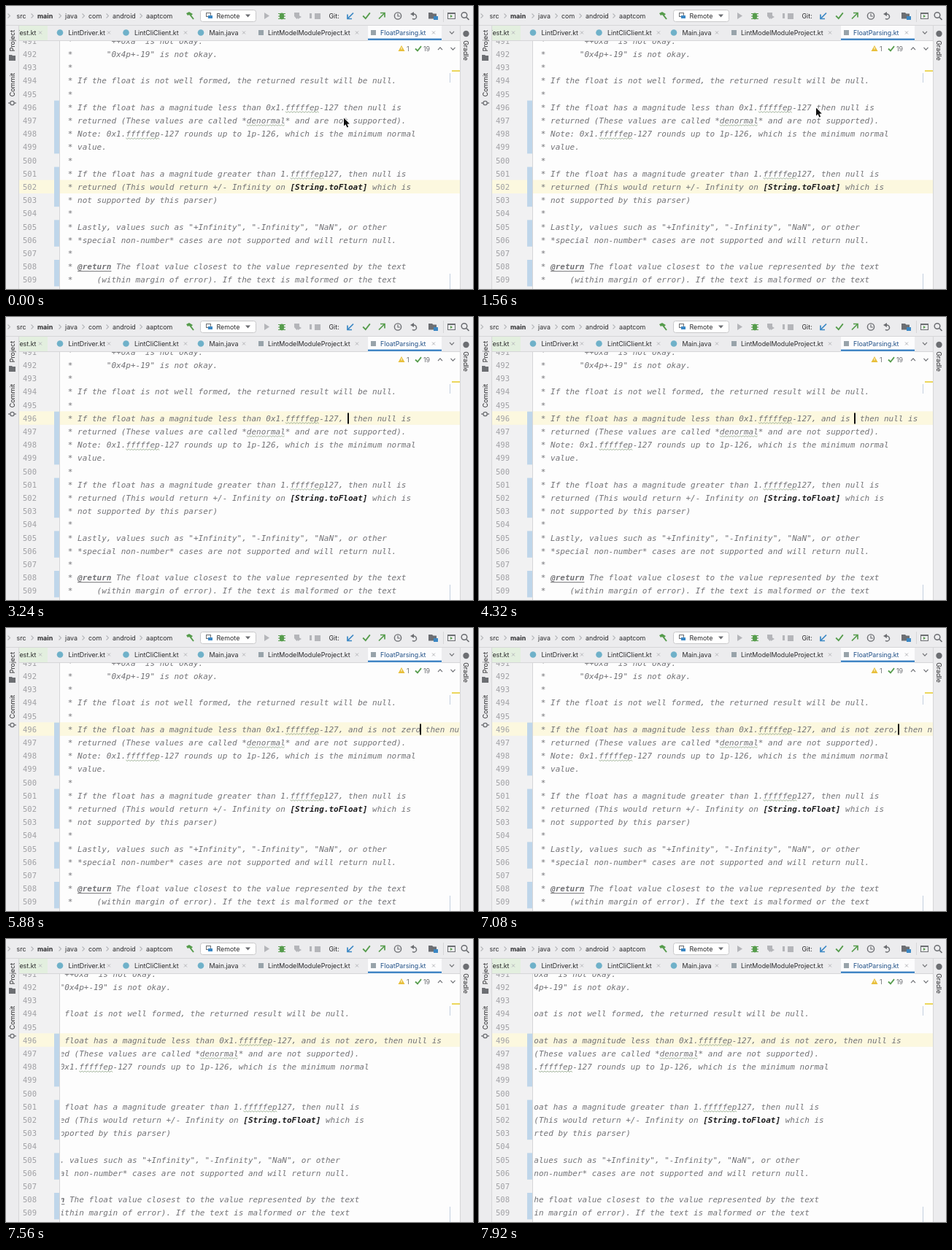
Write an HTML page with a canvas that moves like this. It is 640 px wide and 388 px high and loops after 8000 ms.

```html
<!DOCTYPE html>
<html lang="en">
<head>
<meta charset="utf-8">
<title>Editing a comment</title>
<style>
html, body { margin: 0; width: 100%; height: 100%; overflow: hidden; background: #fdfdfd; }
canvas { display: block; width: 640px; height: 388px; }
</style>
</head>
<body>
<canvas id="stage" width="640" height="388"></canvas>
<script>
const ctx = document.getElementById('stage').getContext('2d');
const LOOP = 8000, STEP = 120;
const MONO = '"DejaVu Sans Mono", "Noto Sans Mono", monospace';
const UI = 'Inter, Roboto, sans-serif';
const CODE = `italic 11px ${MONO}`, CODE_BOLD = `italic bold 11px ${MONO}`;
const LABEL = `8.9px ${UI}`;
const LEFT = 76, RIGHT = 622, TEXT_X = 84.8, ROW = 18.2, FIRST = 491;
const C = {
  paper: '#fdfdfd', chrome: '#ececee', gutter: '#f1f1f2', caretRow: '#fcf8df',
  edge: '#d6d6d8', text: '#727276', strong: '#1c1c1e', num: '#a0a0a4',
  change: '#bfd6ea', ink: '#2a2a2c', grey: '#6c6e72', pale: '#b4b5b9',
  green: '#569c4c', blue: '#3a87c4', wave: '#a3b59c', margin: '#c3cfdf'
};

const BEFORE = '* If the float has a magnitude less than 0x1.fffffep-127';
const AFTER = ' then null is';
const ADDED = ', and is not zero,';
const KEYS = [2640, 2880, 3480, 3600, 3720, 3840, 3960, 4080, 4200,
  4680, 4800, 4920, 5040, 5280, 5400, 5520, 5640, 6600];
const CLICK = 1920;

const LINES = [
  '*       "++0xa" is not okay.',
  '*       "0x4p+-19" is not okay.',
  '*',
  '* If the float is not well formed, the returned result will be null.',
  '*',
  '',
  '* returned (These values are called *denormal* and are not supported).',
  '* Note: 0x1.fffffep-127 rounds up to 1p-126, which is the minimum normal',
  '* value.',
  '*',
  '* If the float has a magnitude greater than 1.fffffep127, then null is',
  '* returned (This would return +/- Infinity on [String.toFloat] which is',
  '* not supported by this parser)',
  '*',
  '* Lastly, values such as "+Infinity", "-Infinity", "NaN", or other',
  '* *special non-number* cases are not supported and will return null.',
  '*',
  '* @return The float value closest to the value represented by the text',
  '*     (within margin of error). If the text is malformed or the text'
];
const CHANGED = [[496, 499], [501, 503], [505, 506], [508, 509]];
const SPECIAL = /(\[String\.toFloat\]|@return|fffffep|denormal)/;

const rowY = n => 47.8 + (n - FIRST) * ROW;
const clamp = v => Math.max(0, Math.min(1, v));
const smooth = v => v * v * (3 - 2 * v);

function rect(x, y, w, h, color) {
  ctx.fillStyle = color;
  ctx.fillRect(x, y, w, h);
}

function dot(x, y, r, color) {
  ctx.fillStyle = color;
  ctx.beginPath();
  ctx.arc(x, y, r, 0, Math.PI * 2);
  ctx.fill();
}

function shape(points, color, fill, width = 1.2) {
  ctx.beginPath();
  for (let i = 0; i < points.length; i += 2) ctx.lineTo(points[i], points[i + 1]);
  if (fill) {
    ctx.closePath();
    ctx.fillStyle = color;
    ctx.fill();
  } else {
    ctx.strokeStyle = color;
    ctx.lineWidth = width;
    ctx.stroke();
  }
}

function arc(x, y, r, from, to, color, width = 1.2) {
  ctx.beginPath();
  ctx.arc(x, y, r, from, to);
  ctx.strokeStyle = color;
  ctx.lineWidth = width;
  ctx.stroke();
}

function frame(x, y, w, h, color) {
  ctx.strokeStyle = color;
  ctx.lineWidth = 1;
  ctx.strokeRect(x, y, w, h);
}

function label(str, x, y, color = C.ink, font = LABEL, align = 'left') {
  ctx.font = font;
  ctx.fillStyle = color;
  ctx.textAlign = align;
  ctx.fillText(str, x, y);
}

function sideLabel(str, x, y, angle) {
  ctx.save();
  ctx.translate(x, y);
  ctx.rotate(angle);
  label(str, 0, 3.2, C.ink, LABEL, 'center');
  ctx.restore();
}

function cross(x, y) {
  shape([x - 2, y - 2, x + 2, y + 2], C.pale, false, 1);
  shape([x - 2, y + 2, x + 2, y - 2], C.pale, false, 1);
}

function chevron(x, y, dx, dy, color = C.grey) {
  const pts = dx ? [x - dx, y - 3, x + dx, y, x - dx, y + 3]
    : [x - 3, y - dy, x, y + dy, x + 3, y - dy];
  shape(pts, color, false, 1.1);
}

function check(x, y, s) {
  shape([x - s, y, x - s * .25, y + s * .75, x + s, y - s * .85], C.green, false, 1.8);
}

function arrow(x, y, d, color) {
  shape([x - 4 * d, y + 4 * d, x + 4 * d, y - 4 * d], color, false, 1.7);
  shape([x - 2 * d, y - 4 * d, x + 4 * d, y - 4 * d, x + 4 * d, y + 2 * d], color, false, 1.7);
}

function wave(x, y, w) {
  ctx.beginPath();
  for (let i = 0; i <= w; i += 2) ctx.lineTo(x + i, y + (i % 4 ? 1 : -.5));
  ctx.strokeStyle = C.wave;
  ctx.lineWidth = 1;
  ctx.stroke();
}

function codeLine(str, x, y, cell) {
  let col = 0;
  for (const part of str.split(SPECIAL)) {
    const px = x + col * cell, w = part.length * cell;
    const link = part[0] === '[', tag = part === '@return';
    label(part, px, y + 4, link ? C.strong : C.text, link || tag ? CODE_BOLD : CODE);
    if (tag) rect(px, y + 6, w, 1, C.text);
    if (part === 'fffffep' || part === 'denormal') wave(px, y + 6.3, w);
    col += part.length;
  }
}

function toolbar() {
  rect(0, 0, 640, 26, C.chrome);
  rect(0, 26, 640, 1, C.edge);
  chevron(4, 13.5, 1.5, 0, C.pale);
  const path = [['src', 14.5], ['main', 43], ['java', 81], ['com', 113], ['android', 146], ['aaptcom', 192]];
  for (const [name, x] of path) {
    label(name, x, 16.7, C.ink, name === 'main' ? `bold 8.9px ${UI}` : LABEL);
    if (x > 20) chevron(x - 7, 13.5, 1.5, 0, C.pale);
  }

  // build and run
  shape([247, 10, 251, 8, 256, 11, 254, 13, 251, 12, 249, 13], C.green, true);
  shape([251.5, 11, 257, 18], C.green, false, 2);
  ctx.beginPath();
  ctx.roundRect(266.5, 5.5, 76, 16, 3);
  ctx.fillStyle = '#fff';
  ctx.fill();
  ctx.strokeStyle = '#c8c8ca';
  ctx.lineWidth = 1;
  ctx.stroke();
  frame(274.5, 9.5, 6, 5, C.grey);
  rect(277, 13, 6, 4, C.blue);
  label('Remote', 288.5, 16.7);
  shape([328, 11.5, 335, 11.5, 331.5, 15.5], C.grey, true);
  shape([354, 9, 361, 13.5, 354, 18], C.pale, true);

  // debug tools
  ctx.fillStyle = C.green;
  ctx.beginPath();
  ctx.ellipse(378, 14, 3.2, 4.4, 0, 0, Math.PI * 2);
  ctx.fill();
  for (const y of [10.5, 14, 17.5]) shape([373, y, 383, y], C.green, false, 1);
  shape([395, 9, 402, 9, 402, 14, 398.5, 18, 395, 14], C.pale, true);
  shape([400, 12, 405, 15, 400, 18], C.pale, true);
  rect(416, 10, 3, 7, C.pale);
  rect(423, 10, 8, 8, C.pale);

  label('Git:', 442.5, 16.7);
  arrow(472, 13.5, -1, C.blue);
  check(494, 13.5, 4.8);
  arrow(515, 13.5, 1, C.green);
  arc(537, 13.5, 4.6, 0, 7, C.grey, 1.4);
  shape([537, 10.5, 537, 14, 540, 14], C.grey, false, 1.2);
  arc(559, 14.5, 3.5, -1.7, 2.2, C.grey, 1.5);
  shape([554, 11, 559, 8, 559, 14], C.grey, true);
  shape([579, 9, 584, 9, 585.5, 10.5, 590, 10.5, 590, 17.5, 579, 17.5], C.grey, true);
  rect(586, 14, 6, 5, C.blue);
  rect(599, 5, 1, 17, C.edge);
  frame(605.5, 9.5, 10, 8, C.grey);
  rect(605, 9, 11, 2, C.grey);
  shape([609, 12, 612, 14, 609, 16], C.green, true);
  arc(628, 12.5, 3.8, 0, 7, C.grey, 1.5);
  shape([631, 15.5, 634.5, 19], C.grey, false, 1.7);
}

function tabs() {
  rect(17, 27, 605, 20, C.chrome);
  rect(17, 27, 40, 20, '#e3efdf');
  rect(496, 27, 101, 20, '#fcfcfd');
  rect(496, 44.5, 101, 2.5, '#4286c5');
  rect(17, 47, 479, 1, C.edge);
  rect(597, 47, 25, 1, C.edge);
  ctx.save();
  ctx.beginPath();
  ctx.rect(17, 27, 605, 20);
  ctx.clip();
  label('Test.kt', 41.5, 40, C.ink, LABEL, 'right');
  ctx.restore();
  cross(47, 36.5);
  const items = [
    ['LintDriver.kt', 85.5, 141, 0], ['LintCliClient.kt', 176, 246, 0], ['Main.java', 278.5, 326, 0],
    ['LintModelModuleProject.kt', 359, 481, 1], ['FloatParsing.kt', 513, 586, 1]
  ];
  for (const [name, x, close, file] of items) {
    if (file) rect(x - 13, 33, 7, 7, '#98a3aa');
    else dot(x - 11.5, 36.5, 4.3, '#6fb1c9');
    label(name, x, 40, close === 586 ? '#1f4f86' : C.ink);
    cross(close, 36.5);
  }
  chevron(611, 36.5, 0, 1.7);
}

function sides() {
  rect(0, 27, 17, 361, C.chrome);
  rect(17, 27, 1, 361, C.edge);
  rect(RIGHT, 27, 18, 361, C.chrome);
  rect(RIGHT, 27, 1, 361, C.edge);
  sideLabel('Project', 8.5, 47.5, -Math.PI / 2);
  shape([4, 67, 8, 67, 9, 68, 13, 68, 13, 75, 4, 75], C.grey, true);
  sideLabel('Commit', 8.5, 108, -Math.PI / 2);
  arc(8.5, 133, 2.7, 0, 7, C.grey, 1.3);
  shape([3, 133, 6, 133], C.grey, false, 1.3);
  shape([11, 133, 14, 133], C.grey, false, 1.3);
  dot(630.5, 38, 4.2, C.grey);
  sideLabel('Gradle', 630.5, 61, Math.PI / 2);
}

function inspections() {
  shape([542, 54, 546.5, 62, 537.5, 62], '#e8bf3a', true);
  rect(541.5, 56.5, 1, 3, C.paper);
  label('1', 549, 61.8, C.grey);
  check(565, 58.5, 4);
  label('19', 572, 61.8, C.grey);
  chevron(595, 58.5, 0, -1.7);
  chevron(612.5, 58.5, 0, 1.7);
  rect(611, 88, 11, 2, '#ecd75c');
  rect(608, 92, 1, 13, C.margin);
  rect(608, 367, 1, 21, C.margin);
}

function pointer(t) {
  if (t >= KEYS[0]) return;
  const move = smooth(clamp((t - 720) / 720));
  const settle = smooth(clamp((t - 1560) / 300));
  ctx.save();
  ctx.translate(463 - move - 5 * settle, 153.5 - 14 * move);
  ctx.beginPath();
  for (const [x, y] of [[0, 0], [0, 11], [2.5, 8.8], [4.4, 13], [6.2, 12.2], [4.4, 8.2], [7.8, 8]]) ctx.lineTo(x, y);
  ctx.closePath();
  ctx.lineJoin = 'round';
  ctx.strokeStyle = '#fff';
  ctx.lineWidth = 1.8;
  ctx.stroke();
  ctx.fillStyle = '#111';
  ctx.fill();
  ctx.restore();
}

function caretOn(t) {
  if (t < CLICK) return false;
  const last = KEYS.filter(k => k <= t).pop() ?? CLICK;
  if (t >= 7080) return t < 7560;
  return Math.floor((t - last) / 500) % 2 === 0;
}

function editor(t) {
  const typed = ADDED.slice(0, KEYS.filter(k => k <= t).length);
  const scroll = 82.3 * smooth(clamp((t - 7080) / 690));
  const active = t < CLICK ? 502 : 496;
  ctx.font = CODE;
  const cell = ctx.measureText('0').width;

  rect(17, 47, 605, 341, C.paper);
  rect(18, 47, 55, 341, C.gutter);
  rect(18, rowY(active) - 9.5, RIGHT - 18, 18.5, C.caretRow);
  for (const [a, b] of CHANGED) rect(66, rowY(a) - 9.2, 7, (b - a + 1) * ROW, C.change);
  rect(73, 47, 1, 341, C.edge);
  LINES.forEach((line, i) => {
    const n = FIRST + i;
    label(n, 42, rowY(n) + 4, C.num, `10.5px ${MONO}`, 'right');
  });

  ctx.save();
  ctx.beginPath();
  ctx.rect(LEFT, 47, RIGHT - LEFT, 341);
  ctx.clip();
  LINES.forEach((line, i) => {
    const n = FIRST + i;
    codeLine(n === 496 ? BEFORE + typed + AFTER : line, TEXT_X - scroll, rowY(n), cell);
  });
  if (caretOn(t)) {
    const x = TEXT_X - scroll + (BEFORE.length + typed.length) * cell;
    rect(Math.round(x) - 1, 131.5, 2, 15, '#111');
  }
  ctx.restore();
}

function draw(now) {
  const t = Math.floor((now % LOOP) / STEP) * STEP;
  editor(t);
  inspections();
  tabs();
  sides();
  toolbar();
  pointer(t);
}

const start = performance.now();
function tick() {
  draw(performance.now() - start);
  requestAnimationFrame(tick);
}
tick();
</script>
</body>
</html>
```
